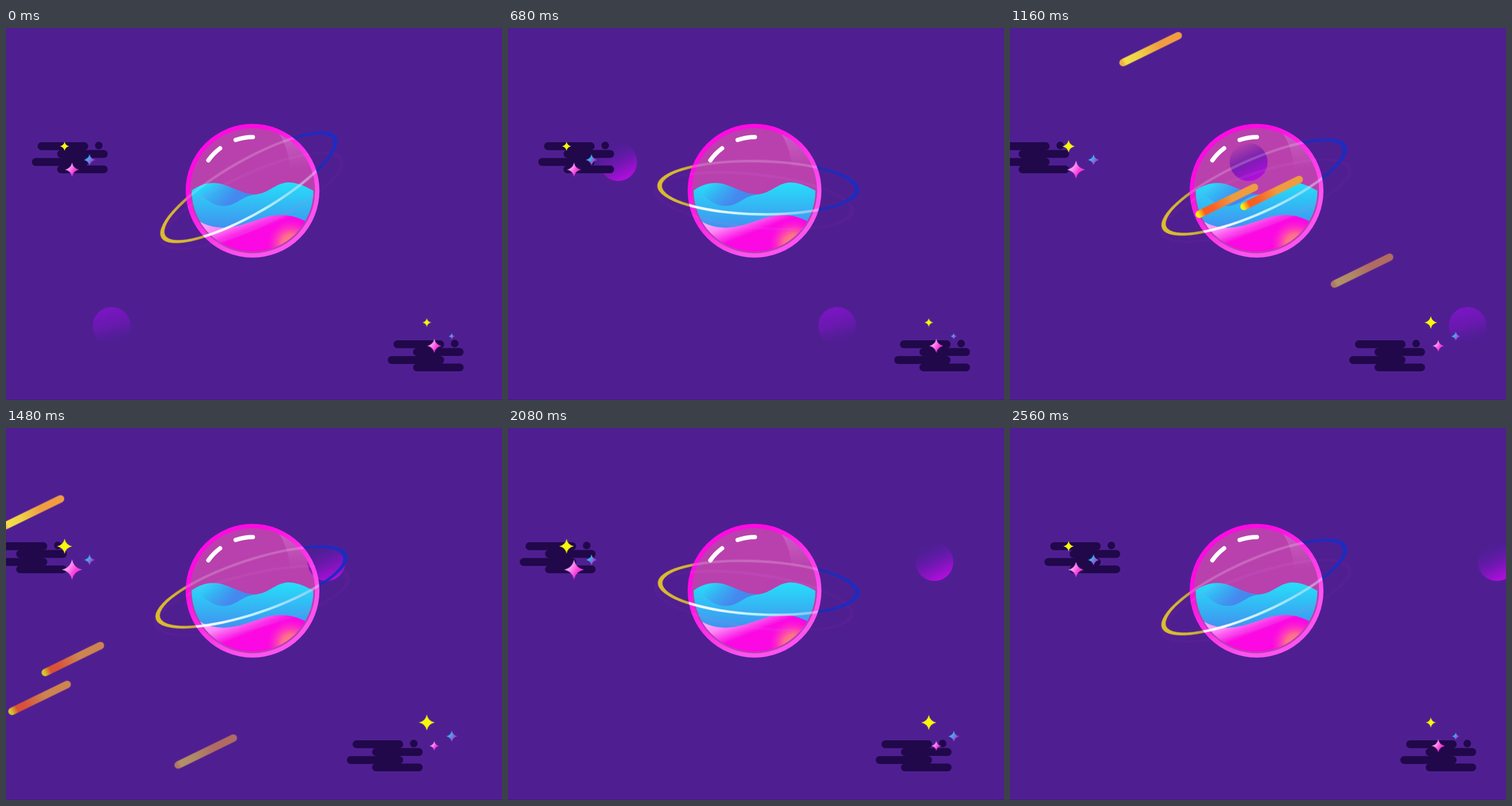
Write an HTML page that moves like this. It is 864 px wide and 648 px high and loops after 2600 ms.

```html
<!DOCTYPE html>
<html lang="en">
<head>
<meta charset="utf-8">
<title>Planet</title>
<style>
html, body { margin: 0; width: 100%; height: 100%; overflow: hidden; background: #4f1f92; }
svg { display: block; width: 100vw; height: 100vh; }
.cloud, .spin, .moon, .star, .meteor, .last { animation: 2600ms linear infinite; }
.cloud { animation-name: sway; fill: #20084a; }
.spin { animation-name: spin; transform-origin: 428.3px 301px; }
.moon { animation-name: cross; }
.star { animation-name: pulse; }
.meteor { animation-name: fly; }
.last { animation-name: land; }

@keyframes sway {
  0% { transform: translateX(0); }
  19.42% { transform: translateX(37.8px); }
  48.08% { transform: translateX(-89.2px); }
  80% { transform: translateX(-24.5px); }
  100% { transform: translateX(18.2px); }
}
@keyframes spin {
  0% { transform: rotate(-30deg); }
  19.8% { transform: rotate(10deg); }
  48.85% { transform: rotate(-30deg); }
  76.2% { transform: rotate(8.6deg); }
  100% { transform: rotate(-26.2deg); }
}
@keyframes cross {
  0% { transform: translateX(0); }
  29.23% { transform: translateX(435px); }
  65.96% { transform: translateX(860.5px); }
  100% { transform: translateX(1054.5px); }
}
@keyframes pulse {
  0%, 29.23% { transform: scale(var(--a)); }
  67.5% { transform: scale(var(--b)); }
  100% { transform: scale(calc(var(--a) * .894 + var(--b) * .106)); }
}
@keyframes fly {
  0%, 35.37% { opacity: 0; transform: translate(calc(var(--dx) * -.75), calc(var(--dy) * -.75)); }
  35.38% { opacity: 1; transform: translate(calc(var(--dx) * -.75), calc(var(--dy) * -.75)); }
  44.62% { opacity: 1; transform: translate(0, 0); }
  56.92% { opacity: var(--fade); transform: translate(var(--dx), var(--dy)); }
  65.38% { opacity: var(--fade); transform: translate(calc(var(--dx) * 1.6875), calc(var(--dy) * 1.6875)); }
  65.39%, 100% { opacity: 0; transform: translate(calc(var(--dx) * 1.6875), calc(var(--dy) * 1.6875)); }
}
@keyframes land {
  0%, 35.37% { opacity: 0; transform: translate(199px, -106px); }
  35.38% { opacity: .6; transform: translate(199px, -106px); }
  59.23% { opacity: .6; transform: translate(-315px, 167px); }
  66.1%, 100% { opacity: 0; transform: translate(-315px, 167px); }
}
</style>
</head>
<body>
<svg viewBox="0 0 864 648" preserveAspectRatio="none">
<defs>
  <linearGradient id="rim" x1="0" y1="0" x2=".8" y2="1">
    <stop offset=".3" stop-color="#ff0ae2"/><stop offset=".8" stop-color="#ff52f0"/>
  </linearGradient>
  <linearGradient id="shine" gradientUnits="userSpaceOnUse" x1="500" y1="185" x2="510" y2="245">
    <stop stop-color="#cf72cc" stop-opacity=".6"/><stop offset="1" stop-color="#cf72cc" stop-opacity="0"/>
  </linearGradient>
  <linearGradient id="water" gradientUnits="userSpaceOnUse" x1="0" y1="269" x2="0" y2="348">
    <stop stop-color="#26dff9"/><stop offset="1" stop-color="#4092ef"/>
  </linearGradient>
  <linearGradient id="swell" gradientUnits="userSpaceOnUse" x1="345" y1="276" x2="388" y2="308">
    <stop stop-color="#4588ee" stop-opacity="0"/><stop offset="1" stop-color="#4588ee"/>
  </linearGradient>
  <linearGradient id="sand" gradientUnits="userSpaceOnUse" x1="397" y1="326" x2="415" y2="372">
    <stop stop-color="#ff9dff"/><stop offset=".25" stop-color="#ff86f8"/><stop offset=".8" stop-color="#fb08e2"/>
  </linearGradient>
  <radialGradient id="glow" gradientUnits="userSpaceOnUse" cx="497" cy="376" r="42">
    <stop stop-color="#ff8f6c"/><stop offset=".4" stop-color="#ff7884" stop-opacity=".9"/>
    <stop offset="1" stop-color="#ff30cc" stop-opacity="0"/>
  </radialGradient>
  <linearGradient id="band" gradientUnits="userSpaceOnUse" x1="259" y1="0" x2="612" y2="0">
    <stop stop-color="#dcbd2c"/><stop offset=".12" stop-color="#d6b633"/><stop offset=".3" stop-color="#a97f50"/>
    <stop offset=".7" stop-color="#2626a8"/><stop offset=".9" stop-color="#1c2cc0"/>
  </linearGradient>
  <linearGradient id="front" gradientUnits="userSpaceOnUse" x1="310" y1="0" x2="560" y2="0">
    <stop stop-color="#fff" stop-opacity=".9"/><stop offset=".2" stop-color="#fff" stop-opacity=".95"/>
    <stop offset=".55" stop-color="#c4fbff" stop-opacity=".85"/><stop offset="1" stop-color="#e8ccff" stop-opacity=".4"/>
  </linearGradient>
  <linearGradient id="dusk" x1=".3" y1=".02" x2=".75" y2=".95">
    <stop stop-color="#5020a0" stop-opacity="0"/><stop offset=".5" stop-color="#7217b4" stop-opacity=".85"/>
    <stop offset="1" stop-color="#b80de0"/>
  </linearGradient>
  <linearGradient id="dawn" x1=".35" y1="0" x2=".6" y2="1">
    <stop offset=".1" stop-color="#7916c2"/><stop offset=".5" stop-color="#6c19b2" stop-opacity=".85"/>
    <stop offset=".95" stop-color="#5a1ca0" stop-opacity="0"/>
  </linearGradient>
  <linearGradient id="cyan" x1="0" y1="0" x2="1" y2=".6">
    <stop offset=".35" stop-color="#2fc4f4"/><stop offset=".8" stop-color="#a04bd0"/>
  </linearGradient>
  <linearGradient id="pink" x1="0" y1=".2" x2="1" y2=".8">
    <stop offset=".3" stop-color="#ff9cf4"/><stop offset=".65" stop-color="#fa3cdc"/>
  </linearGradient>
  <linearGradient id="gold" gradientUnits="userSpaceOnUse" x1="-6" y1="0" x2="102" y2="0">
    <stop offset=".05" stop-color="#f0b044"/><stop offset=".1" stop-color="#f3df48"/>
    <stop offset=".35" stop-color="#f0cf48"/><stop offset=".7" stop-color="#f09c42"/>
  </linearGradient>
  <linearGradient id="fire" gradientUnits="userSpaceOnUse" x1="-6" y1="0" x2="102" y2="0">
    <stop offset=".04" stop-color="#f4f010"/><stop offset=".15" stop-color="#ff5a1c"/>
    <stop offset=".3" stop-color="#fa5f22"/><stop offset=".65" stop-color="#ee9c3e"/>
  </linearGradient>

  <clipPath id="globe"><circle cx="429.5" cy="283.5" r="116.5"/></clipPath>
  <clipPath id="bowl"><circle cx="429.5" cy="283.5" r="106"/></clipPath>
  <clipPath id="space">
    <path clip-rule="evenodd" d="M0 0H864V648H0ZM313 283.5a116.5 116.5 0 0 0 233 0a116.5 116.5 0 0 0-233 0Z"/>
  </clipPath>

  <path id="ring" fill-rule="evenodd" d="M259.500 278a176 48.500 0 0 0 352 0a176 48.500 0 0 0-352 0ZM267.500 278a168 44 0 0 1 336 0a168 44 0 0 1-336 0Z"/>
  <path id="near" d="M259.500 278a176 48.500 0 0 0 352 0h-8a168 44 0 0 1-336 0Z"/>
  <path id="far" d="M259.500 278a176 48.500 0 0 1 352 0h-8a168 44 0 0 0-336 0Z"/>
  <use id="echo" href="#ring" transform="rotate(5 428.3 301) translate(-7.2 23)"/>
  <path id="spark" d="M0-10Q1.700-1.700 10 0Q1.700 1.700 0 10Q-1.700 1.700-10 0Q-1.700-1.700 0-10Z"/>
  <rect id="bolt" x="-6.500" y="-6.500" width="120" height="13" rx="6.500"/>
  <g id="puff">
    <rect x="55" y="199" width="88" height="13.700" rx="6.800"/>
    <rect x="89" y="212.500" width="88" height="13.700" rx="6.800"/>
    <rect x="45" y="226.500" width="98" height="13.700" rx="6.800"/>
    <rect x="89" y="239.500" width="88" height="13.500" rx="6.700"/>
    <rect x="96" y="206" width="40" height="40"/>
    <circle cx="161.500" cy="204.700" r="6.600"/>
  </g>
</defs>

<rect width="864" height="648" fill="#4f1f92"/>
<rect y="647" width="864" height="1" fill="#401a7c"/>

<circle cx="429.5" cy="283.5" r="112" fill="#b941ad"/>
<path d="M474 181Q493 210 495 248L536 250Q520 196 474 181Z" fill="url(#shine)"/>
<g clip-path="url(#bowl)">
  <path d="M320 285C334 275 347 270 361 270C388 270 406 290 432 290C456 290 470 269 492 269C508 269 522 276 540 286V400H320Z" fill="url(#water)"/>
  <path d="M436 290C410 292 402 310 379 310C360 310 346 298 330 280C340 273 350 270 361 270C388 270 408 290 436 290Z" fill="url(#swell)"/>
  <path id="dune" d="M330 333C346 343 360 348 380 348C418 347 444 326 478 326C496 326 510 330 530 341V400H330Z" fill="url(#sand)"/>
  <use href="#dune" style="fill:url(#glow)"/>
  <path d="M330 333C346 343 360 348 380 348C418 347 444 326 478 326C496 326 510 330 530 341V400H330Z" fill="url(#glow)"/>
</g>
<g fill="none" stroke="#fff" stroke-width="7.5" stroke-linecap="round">
  <path d="M352.500 230.500A93.500 93.500 0 0 1 373 209.500"/>
  <path d="M400 195A93.500 93.500 0 0 1 430 190"/>
</g>

<g class="moon">
  <circle cx="-198" cy="233.5" r="33" fill="url(#dusk)"/>
  <circle cx="183.5" cy="519" r="33" fill="url(#dawn)"/>
</g>
<circle cx="429.5" cy="283.5" r="112.7" fill="none" stroke="url(#rim)" stroke-width="7.6"/>

<g clip-path="url(#space)">
  <g class="spin">
    <use href="#echo" fill="#74249f" fill-opacity=".2"/>
    <use href="#ring" fill="url(#band)"/>
  </g>
</g>
<g clip-path="url(#globe)">
  <g class="spin">
    <use href="#echo" fill="#d070e0" fill-opacity=".12"/>
    <use href="#far" fill="#fff" fill-opacity=".2"/>
    <use href="#near" fill="url(#front)"/>
  </g>
</g>

<g class="cloud">
  <use href="#puff"/>
  <use href="#puff" x="620" y="345"/>
</g>

<g fill="#f8f80a">
  <g transform="translate(102 206)"><use class="star" href="#spark" style="--a:.8;--b:1.52"/></g>
  <g transform="translate(733 513)"><use class="star" href="#spark" style="--a:.75;--b:1.62"/></g>
</g>
<g fill="url(#cyan)">
  <g transform="translate(145.500 229.700)"><use class="star" href="#spark" style="--a:1;--b:.92"/></g>
  <g transform="translate(776.500 537)"><use class="star" href="#spark" style="--a:.55;--b:1.15"/></g>
</g>
<g fill="url(#pink)">
  <g transform="translate(115 246.700)"><use class="star" href="#spark" style="--a:1.22;--b:2.02"/></g>
  <g transform="translate(746 553.700)"><use class="star" href="#spark" style="--a:1.23;--b:.66"/></g>
</g>

<g class="meteor" style="--dx:-198px;--dy:110px;--fade:1">
  <use href="#bolt" transform="translate(197.500 60) rotate(-26)" fill="url(#gold)"/>
</g>
<g class="meteor" style="--dx:-319px;--dy:169px;--fade:.8">
  <use href="#bolt" transform="translate(330.500 324) rotate(-26)" fill="url(#fire)"/>
</g>
<g class="meteor" style="--dx:-339px;--dy:115px;--fade:.8">
  <use href="#bolt" transform="translate(408.500 310.500) rotate(-26)" fill="url(#fire)"/>
</g>
<g class="last">
  <use href="#bolt" transform="translate(566 446) rotate(-26)" fill="url(#gold)"/>
</g>
</svg>
</body>
</html>
```
